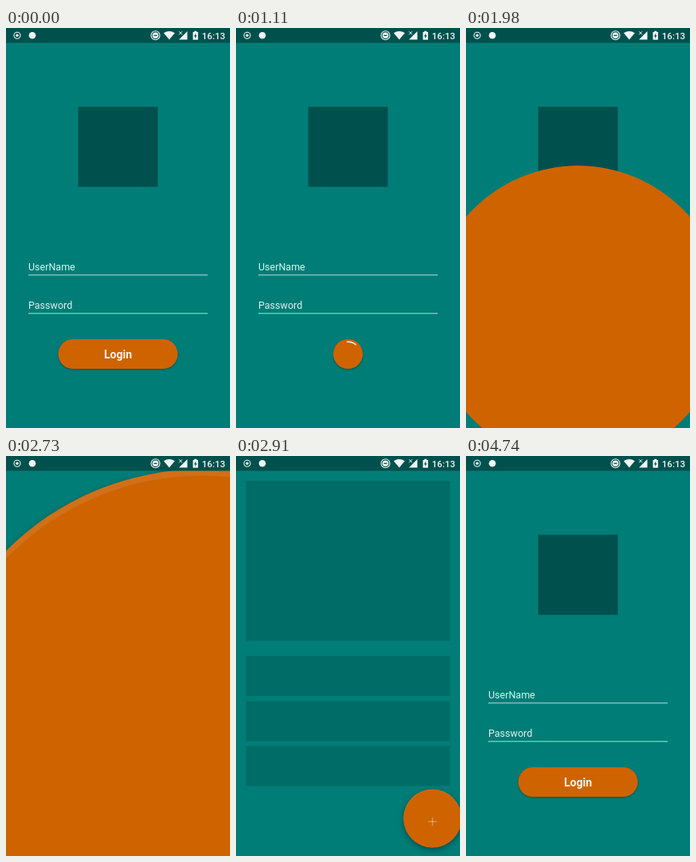
An HTML page with a canvas that plays this animation: 281x500 px, repeating every 4.83 s.

```html
<!DOCTYPE html>
<html lang="en">
<head>
<meta charset="utf-8">
<title>Login transition</title>
<style>
  html, body { margin: 0; width: 100%; height: 100%; overflow: hidden; background: #007d77; }
  canvas { display: block; width: 281px; height: 500px; }
</style>
</head>
<body>
<canvas id="stage"></canvas>
<script>
const W = 281, H = 500, LOOP = 4830, TICK = 30;
const TEAL = '#007d77', DARK = '#00504e', ORANGE = '#cf6300', RIM = '#d07018', WHITE = '#f1f6f8';
const FONT = 'Roboto, Arial, sans-serif';
const BAR = 18.5;
const BTN = { x: 140.5, y: 407.5, r: 18.6, half: 75 };
const FAB = { x: 246.5, y: 457, r: 22 };

const canvas = document.getElementById('stage');
const ctx = canvas.getContext('2d');
const dpr = window.devicePixelRatio || 1;
canvas.width = Math.round(W * dpr);
canvas.height = Math.round(H * dpr);

const clamp = v => Math.min(1, Math.max(0, v));
const span = (t, from, to) => clamp((t - from) / (to - from));
const easeInOut = p => (1 - Math.cos(Math.PI * p)) / 2;
const rad = deg => deg * Math.PI / 180;

function rect(x, y, w, h, color) {
  ctx.fillStyle = color;
  ctx.fillRect(x, y, w, h);
}

function disc(x, y, r, color) {
  ctx.fillStyle = color;
  ctx.beginPath();
  ctx.arc(x, y, r, 0, Math.PI * 2);
  ctx.fill();
}

function ring(x, y, r, width, from = 0, to = Math.PI * 2) {
  ctx.strokeStyle = WHITE;
  ctx.lineWidth = width;
  ctx.beginPath();
  ctx.arc(x, y, r, from, to);
  ctx.stroke();
}

function poly(points, color) {
  ctx.fillStyle = color;
  ctx.beginPath();
  points.forEach(([x, y]) => ctx.lineTo(x, y));
  ctx.closePath();
  ctx.fill();
}

function label(str, x, y, size, weight = 400, align = 'left', color = WHITE) {
  ctx.font = `${weight} ${size}px ${FONT}`;
  ctx.textAlign = align;
  ctx.fillStyle = color;
  ctx.fillText(str, x, y);
}

// Canvas shadows ignore the transform, so scale them by hand.
function withShadow(alpha, blur, dy, draw) {
  ctx.save();
  ctx.shadowColor = `rgba(0,0,0,${alpha})`;
  ctx.shadowBlur = blur * dpr;
  ctx.shadowOffsetY = dy * dpr;
  draw();
  ctx.restore();
}

function withAlpha(alpha, draw) {
  ctx.save();
  ctx.globalAlpha = alpha;
  draw();
  ctx.restore();
}

function statusBar() {
  rect(0, 0, W, BAR, '#00514d');
  ring(14, 9.3, 4, 1.1);
  disc(14, 9.3, 1.8, WHITE);
  disc(33, 9.3, 4.3, WHITE);

  ring(187.5, 9.3, 5.5, 1.1);
  disc(187.5, 9.3, 3.8, WHITE);
  rect(185.5, 8.7, 4, 1.3, DARK);

  ctx.fillStyle = WHITE;
  ctx.beginPath();
  ctx.moveTo(204.8, 14.6);
  ctx.lineTo(197.8, 6.2);
  ctx.quadraticCurveTo(204.8, 1.8, 211.8, 6.2);
  ctx.fill();

  poly([[227.5, 4], [227.5, 14.5], [217, 14.5]], WHITE);
  ctx.strokeStyle = WHITE;
  ctx.lineWidth = 1;
  ctx.beginPath();
  ctx.moveTo(217, 4.3);
  ctx.lineTo(221, 8.3);
  ctx.moveTo(221, 4.3);
  ctx.lineTo(217, 8.3);
  ctx.stroke();

  rect(234.5, 5, 6.4, 9.7, WHITE);
  rect(236.2, 3.8, 3, 1.4, WHITE);
  poly([[238.3, 6.2], [235.9, 10.4], [237.4, 10.4], [237.1, 13.4], [239.5, 9.2], [238, 9.2]], DARK);

  label('16:13', 275, 13.6, 11.5, 500, 'right');
}

function field(name, y) {
  label(name, 28, y, 12.5, 400, 'left', '#e3f0f0');
  rect(28, y + 5.3, 225, 1, '#b9dcda');
}

function button(t) {
  const morph = easeInOut(span(t, 450, 990));
  const half = BTN.half + (BTN.r - BTN.half) * (t < 480 ? 0 : morph);
  withShadow(0.35, 2.5, 1, () => {
    ctx.fillStyle = ORANGE;
    ctx.beginPath();
    ctx.roundRect(BTN.x - half, BTN.y - BTN.r, half * 2, BTN.r * 2, BTN.r);
    ctx.fill();
  });
  const fade = 1 - span(t, 450, 630);
  if (t < 480 || fade > 0) {
    withAlpha(t < 480 ? 1 : fade, () => label('Login', BTN.x, 412.6, 14, 700, 'center'));
  }
}

function spinner(dt) {
  const start = -112 + 0.175 * dt;
  const sweep = 36 + 270 * easeInOut(clamp(dt / 667));
  ring(BTN.x, BTN.y, 15.2, 1.4, rad(start), rad(start + sweep));
}

function loginScreen(t) {
  rect(90.5, 98.5, 100, 100, DARK);
  field('UserName', 303);
  field('Password', 351);
  if (t < 1560) {
    button(t);
    if (t >= 1020) spinner(t - 1020);
    return;
  }
  // The circle rises as it grows until it covers the screen.
  const grow = 347 * span(t, 1530, 2070) ** 4;
  disc(BTN.x, BTN.y - 0.2955 * grow, BTN.r + grow, ORANGE);
}

function listScreen(t) {
  withAlpha(easeInOut(span(t, 2820, 3030)), () => {
    [[31, 200], [250, 50], [306.5, 50], [362.5, 50]].forEach(([y, h]) => rect(12.5, y, 256, h, DARK));
  });

  const extra = t < 3060 ? 327 * 2 ** (-(t - 2730) / 40) : 0;
  const r = FAB.r + extra;
  const y = FAB.y - 0.28 * extra;
  withShadow(0.4, 7, 2.5, () => disc(FAB.x, y, r, extra > 2 ? RIM : ORANGE));
  if (extra > 2) disc(FAB.x, y + r * 0.01, r * 0.987, ORANGE);

  withAlpha(span(t, 2850, 3030), () => {
    rect(FAB.x - 5.3, FAB.y - 0.75, 10.6, 1.5, WHITE);
    rect(FAB.x - 0.75, FAB.y - 5.3, 1.5, 10.6, WHITE);
  });
}

function render(t) {
  ctx.setTransform(dpr, 0, 0, dpr, 0, 0);
  rect(0, 0, W, H, TEAL);
  if (t >= 4740) loginScreen(0);
  else if (t >= 2730) listScreen(t);
  else if (t >= 2070) rect(0, 0, W, H, ORANGE);
  else loginScreen(t);
  statusBar();
}

const begin = performance.now();
function loop() {
  const t = (performance.now() - begin) % LOOP;
  render(Math.floor(t / TICK) * TICK);
  requestAnimationFrame(loop);
}
loop();
</script>
</body>
</html>
```
